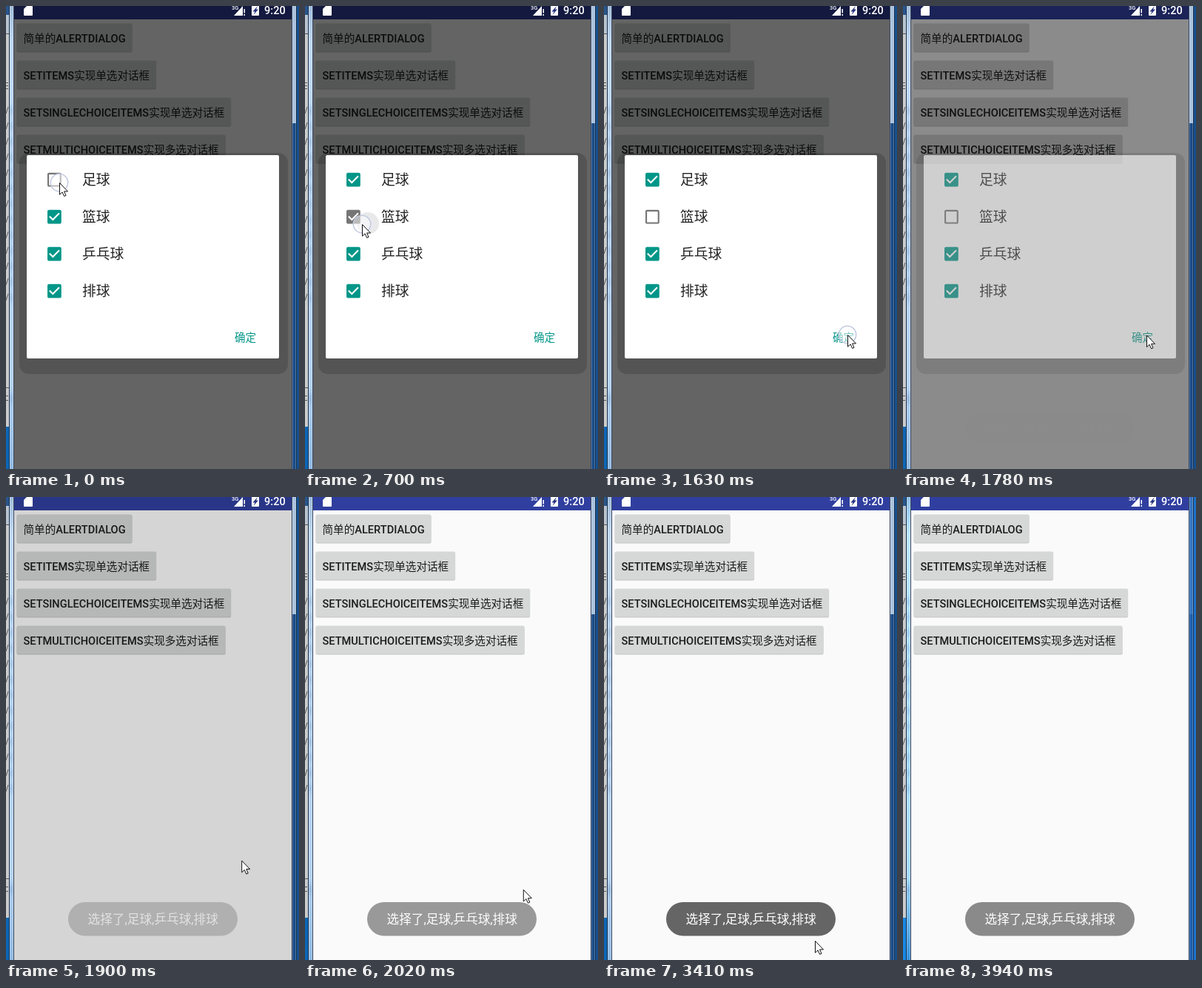
These frames come from a looping animation (396x624 px, 4040 ms). An HTML page:

```html
<!DOCTYPE html>
<html lang="zh-CN">
<head>
<meta charset="utf-8">
<style>
  html, body { margin: 0; width: 100%; height: 100%; overflow: hidden; background: #fafafa; }
  svg { display: block; width: 396px; height: 624px; }
  text { font-family: Roboto, "Noto Sans CJK SC", "Noto Sans CJK", sans-serif; white-space: pre; }
  .latin { font-weight: 500; }
</style>
</head>
<body>
<svg viewBox="0 0 396 624" xmlns="http://www.w3.org/2000/svg">
  <defs>
    <filter id="blur" x="-1" width="3"><feGaussianBlur stdDeviation="1.5 4"/></filter>
    <linearGradient id="glass" x2="0" y2="1">
      <stop offset="0" stop-color="#9fbbd8"/><stop offset=".08" stop-color="#c0d9f2"/>
      <stop offset=".82" stop-color="#b4d2f0"/><stop offset="1" stop-color="#8fb9e2"/>
    </linearGradient>
    <linearGradient id="activeGlass" x2="0" y2="1">
      <stop offset="0" stop-color="#8ebfe8"/><stop offset=".08" stop-color="#b9e6fd"/>
      <stop offset=".82" stop-color="#a5dcfb"/><stop offset="1" stop-color="#2f8fdc"/>
    </linearGradient>
  </defs>

  <rect width="396" height="624" fill="#17508f"/>
  <g id="desktop" stroke="#555">
    <g stroke="none">
      <rect width="4" height="568" fill="#cbcbcb"/>
      <rect width="4" height="12" fill="#28558c"/>
      <rect y="12" width="4" height="26" fill="#b9c3cf"/>
      <rect y="567" width="4" height="57" fill="#0d66b5"/>
    </g>
    <path d="M0 37.5H4M0 514.5H4M0 103.5H3M0 107.5H3M0 111.5H3M0 525.5H3M0 531.5H3"/>
  </g>
  <rect x="4" width="7" height="624" fill="url(#glass)"/>
  <rect x="387" width="6" height="158" fill="#a9c2dc"/>
  <rect x="387" y="158" width="6" height="466" fill="#184a86"/>
  <g id="active">
    <rect x="4" width="7" height="624" fill="url(#activeGlass)"/>
    <rect x="387" width="6" height="158" fill="#3373c0"/>
    <rect x="387" y="158" width="6" height="466" fill="#1a5cac"/>
    <rect x="393" width="3" height="624" fill="#1c72cc"/>
    <rect y="567" width="4" height="57" fill="#1787e2"/>
  </g>
  <g id="reflections" fill="#5f88b5" fill-opacity=".45" filter="url(#blur)"></g>
  <path d="M5.5 0V624M9.5 0V624M387.5 0V624M391.5 0V624" stroke="#fff" stroke-opacity=".25"/>
  <path d="M4.5 0V624M392.5 0V624" stroke="#17304f"/>
  <path d="M10.5 0V624M386.5 0V624" stroke="#3a4660"/>

  <rect x="11" width="375" height="624" fill="#fafafa"/>
  <rect x="11" width="375" height="18" fill="#303f9f"/>
  <g id="buttons" font-size="14.58" fill="#1c1c1c"></g>
  <rect id="dim" x="11" width="375" height="624"/>

  <g fill="#fff">
    <path d="M28 0H35Q36 0 36 1V12Q36 13 35 13H25Q24 13 24 12V4Z"/>
    <path d="M320 0V13H308ZM321.5 4H323V9.5H321.5ZM321.5 11H323V13H321.5Z"/>
    <text x="305" y="5" font-size="7.5" class="latin">3G</text>
    <path d="M332 0H342V12Q342 13 341 13H333Q332 13 332 12Z"/>
    <path d="M340 0 333.5 7.5H336.5L334.5 12 341 4.5H338Z" fill="#26327f"/>
    <text x="349" y="11" font-size="14.58" class="latin">9:20</text>
  </g>

  <g id="dialog">
    <rect x="18" y="198" width="363" height="298" rx="13" fill-opacity=".16"/>
    <rect x="28" y="201" width="341" height="274" rx="2" fill="#fff"/>
    <circle id="ripple" fill="#e9e9ec"/>
    <g id="rows" font-size="18.75" fill="#212121"></g>
    <text x="309" y="452" font-size="14.58" fill="#009688">确定</text>
  </g>

  <g id="toast">
    <rect x="84" y="546" width="229" height="45.5" rx="22.75" fill="#656565"/>
    <text x="110.5" y="575" font-size="16.67" fill="#fff">选择了,足球,乒乓球,排球</text>
  </g>
  <circle id="ring" r="11.7" fill="#fff" fill-opacity=".5" stroke="#c3cbe0" stroke-width="1.6"/>
  <path id="cursor" d="M.5 .5V16.2L4.1 12.8 6.6 18.4 9 17.4 6.6 11.9H11.5Z" fill="#fff" stroke="#111"/>
</svg>
<script>
const NS = 'http://www.w3.org/2000/svg';
const LOOP = 4040;
const TEAL = '#009688', GREY = '#757575';
const CHECKED = 'M19 3H5c-1.1 0-2 .9-2 2v14c0 1.1.9 2 2 2h14c1.1 0 2-.9 2-2V5c0-1.1-.9-2-2-2zm-9 14l-5-5 1.41-1.41L10 14.17l7.59-7.59L19 8l-9 9z';
const EMPTY = 'M19 5v14H5V5h14m0-2H5c-1.1 0-2 .9-2 2v14c0 1.1.9 2 2 2h14c1.1 0 2-.9 2-2V5c0-1.1-.9-2-2-2z';
const $ = id => document.getElementById(id);

function set(node, attrs) {
  for (const key in attrs) node.setAttribute(key, attrs[key]);
}
function add(parent, tag, attrs, text = '') {
  const node = document.createElementNS(NS, tag);
  set(node, attrs);
  node.textContent = text;
  return parent.appendChild(node);
}
const ramp = (t, from, duration) => Math.min(1, Math.max(0, (t - from) / duration));
const mix = (a, b, k) => a + (b - a) * k;
const smooth = k => k * k * (3 - 2 * k);
const easeOut = k => Math.sin(k * Math.PI / 2);

// Text lines of the window behind, also seen blurred through the glass border
for (let y = 145; y < 400; y += 21) {
  add($('desktop'), 'path', { d: `M0 ${y}L3 ${y - 9}` });
  add($('reflections'), 'rect', { x: 5, y: y - 8, width: 4, height: 8 });
}
add($('reflections'), 'rect', { x: 5, y: 523, width: 4, height: 12 });

['简单的ALERTDIALOG', 'SETITEMS实现单选对话框', 'SETSINGLECHOICEITEMS实现单选对话框', 'SETMULTICHOICEITEMS实现多选对话框']
  .forEach((caption, i) => {
    const g = $('buttons'), y = 23.4 + i * 50;
    const label = add(g, 'text', { x: 23.5, y: 49 + i * 50 });
    for (const part of caption.match(/[A-Z]+|[^A-Z]+/g)) {
      add(label, 'tspan', /[A-Z]/.test(part) ? { class: 'latin' } : {}, part);
    }
    const box = { x: 14.6, width: label.getComputedTextLength() + 17.8, height: 38, rx: 2 };
    add(g, 'rect', { ...box, y: y + 1.2, fill: '#000', 'fill-opacity': .22 });
    add(g, 'rect', { ...box, y, fill: '#d6d7d7' });
    g.append(label);
  });

const boxes = ['足球', '篮球', '乒乓球', '排球'].map((name, i) => {
  const y = 234.2 + i * 50;
  add($('rows'), 'text', { x: 103, y: 241 + i * 50 }, name);
  return add($('rows'), 'path', { d: CHECKED, fill: TEAL, transform: `translate(52.9 ${y - 12.5}) scale(1.042)` });
});

// Places where the pointer rests; it may press there until it leaves
const rests = [
  { x: 72, y: 238, arrive: 0, leave: 280, press: 0, ripple: true },
  { x: 77, y: 294, arrive: 550, leave: 850, press: 550, ripple: true },
  { x: 329, y: 443, arrive: 1480, leave: 1780, press: 1630 },
  { x: 261, y: 564, arrive: 2260, leave: 2530 },
  { x: 285, y: 598, arrive: 3410, leave: 3660, sway: 60 }
];

function pointerAt(t) {
  const next = rests.find(rest => t < rest.leave);
  if (!next) return null;
  const from = rests[rests.indexOf(next) - 1] ?? next;
  const k = ramp(t, from.leave, next.arrive - from.leave);
  // Two swings to the left on the last stretch
  const swing = next.sway && t > 2810 && t < next.arrive ? next.sway * Math.sin((t - 2810) * Math.PI / 300) ** 2 : 0;
  return {
    rest: next,
    x: mix(from.x, next.x, smooth(next === from ? 1 : k)) - swing,
    y: mix(from.y, next.y, easeOut(next === from ? 1 : k)) - swing / 2
  };
}

// A box is grey while its mark fades in or out
function toggle(box, t, start, turnsOn) {
  const checked = turnsOn ? t >= start : t < start + 150;
  const fading = t >= start && t < start + 150;
  set(box, { d: checked ? CHECKED : EMPTY, fill: checked && !fading ? TEAL : GREY });
}

function draw(t) {
  const pointer = pointerAt(t);
  const rest = pointer?.rest;
  const pressed = rest && t >= rest.press;
  set($('cursor'), { opacity: pointer ? 1 : 0 });
  if (pointer) {
    set($('cursor'), { transform: `translate(${pointer.x} ${pointer.y})` });
    set($('ring'), { cx: rest.x, cy: rest.y });
    set($('ripple'), { cx: rest.x + 8, cy: rest.y - 1 });
  }
  set($('ring'), { opacity: pressed ? 1 : 0 });
  set($('ripple'), { r: pressed && rest.ripple ? 15 * ramp(t, rest.press, 150) : 0 });

  toggle(boxes[0], t, 130, true);
  toggle(boxes[1], t, 700, false);

  set($('dim'), { opacity: .6 * (1 - ramp(t, 1720, 240)) });
  set($('dialog'), { opacity: 1 - ramp(t, 1720, 150) });
  set($('toast'), { opacity: ramp(t, 1780, 375) * (1 - ramp(t, 3740, 800)) });
  set($('active'), { opacity: ramp(t, 3700, 240) });
}

const start = performance.now();
function tick() {
  draw((performance.now() - start) % LOOP);
  requestAnimationFrame(tick);
}
draw(0);
requestAnimationFrame(tick);
</script>
</body>
</html>
```
